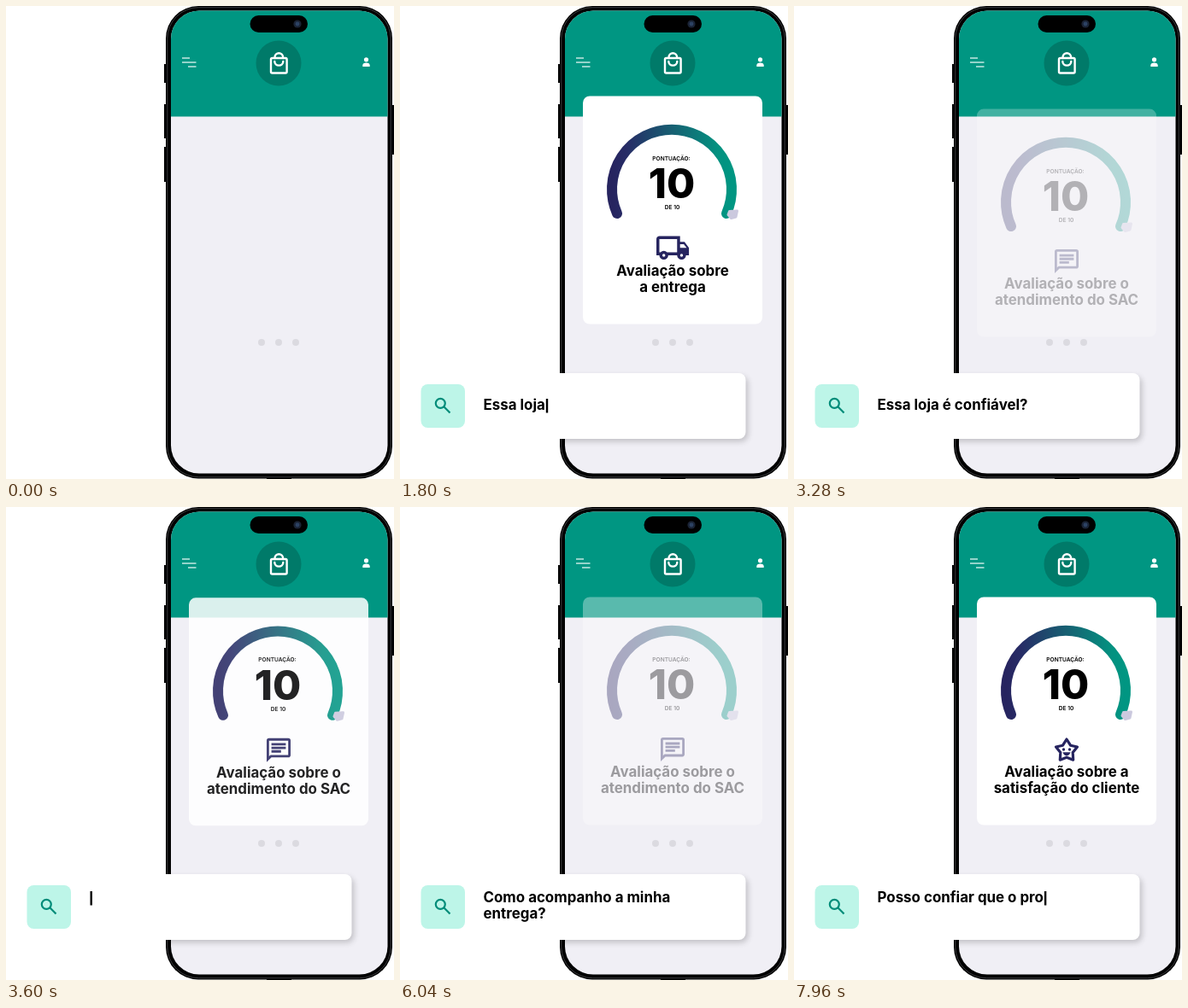
An HTML page for the animation above (8 s loop, 454 by 554 pixels).

```html
<!DOCTYPE html>
<html lang="pt-BR">
<head>
<meta charset="utf-8">
<title>Avaliação da loja</title>
<style>
html, body { margin: 0; width: 100%; height: 100%; overflow: hidden; background: #fff; }
svg { display: block; width: 454px; height: 554px; }
text { font-family: Inter, "Open Sans", sans-serif; font-weight: 700; font-size: 16.9px; white-space: pre; }
.mid { text-anchor: middle; }
.small { font-size: 6.6px; font-weight: 600; }
.score { font-size: 48px; font-weight: 800; }
.navy { fill: #26245f; }
.line { fill: none; stroke-linecap: round; stroke-linejoin: round; }

.card, .bar, .icon { opacity: 0; animation: 8s linear infinite; }
.card1 { animation-name: fade1, rise1; }
.card2 { animation-name: fade2, rise2; }
.card3 { animation-name: fade3, rise3; }
.bar { animation-name: bar; }
.icon { animation-name: icon; }

@keyframes fade1 {
  0%, .375% { opacity: 0; animation-timing-function: cubic-bezier(.3, .36, .65, .75); }
  7.625%, 32.75% { opacity: 1; }
  39.5%, 100% { opacity: 0; }
}
@keyframes fade2 {
  0%, 39.5% { opacity: 0; animation-timing-function: cubic-bezier(.3, .36, .65, .75); }
  46.25%, 71.1% { opacity: 1; }
  77.9%, 100% { opacity: 0; }
}
@keyframes fade3 {
  0%, 77.9% { opacity: 0; animation-timing-function: cubic-bezier(.3, .36, .65, .75); }
  84.6%, 100% { opacity: 1; }
}
/* ease-out quad */
@keyframes rise1 {
  0%, .375% { transform: translateY(25px); animation-timing-function: cubic-bezier(.333, .667, .667, 1); }
  7.625%, 100% { transform: none; }
}
@keyframes rise2 {
  0%, 39.5% { transform: translateY(25px); animation-timing-function: cubic-bezier(.333, .667, .667, 1); }
  46.25%, 100% { transform: none; }
}
@keyframes rise3 {
  0%, 77.9% { transform: translateY(25px); animation-timing-function: cubic-bezier(.333, .667, .667, 1); }
  84.6%, 100% { transform: none; }
}
@keyframes bar { 0%, 7% { opacity: 0; } 12.5%, 100% { opacity: 1; } }
@keyframes icon { 0%, 10.75% { opacity: 0; } 14.75%, 100% { opacity: 1; } }
</style>
</head>
<body>
<svg viewBox="0 0 454 554">
  <defs>
    <linearGradient id="arc" gradientUnits="userSpaceOnUse" x1="248" y1="0" x2="388" y2="0">
      <stop offset="0" stop-color="#26245f"/>
      <stop offset=".12" stop-color="#272c66"/>
      <stop offset=".5" stop-color="#175f72"/>
      <stop offset=".88" stop-color="#049180"/>
      <stop offset="1" stop-color="#009682"/>
    </linearGradient>
    <clipPath id="screen"><rect x="193" y="5.5" width="253.5" height="542" rx="33"/></clipPath>
    <filter id="blur" x="-10%" y="-30%" width="120%" height="160%"><feGaussianBlur stdDeviation="3.5"/></filter>
    <g id="gauge">
      <rect x="214" y="105.5" width="210" height="267" rx="8" fill="#fff"/>
      <path class="line" d="M254 243A70 70 0 1 1 382 243" stroke="url(#arc)" stroke-width="12"/>
      <path class="line" d="M385.5 240.5L394.500 240L393 247L387.500 248.500L384 244.500Z" fill="#cbc9de" stroke="#cbc9de" stroke-width="3" style="fill:#cbc9de"/>
      <text class="mid small" x="317.5" y="180.6">PONTUAÇÃO:</text>
      <text class="mid score" x="318" y="225">10</text>
      <text class="mid small" x="318.5" y="238">DE 10</text>
    </g>
  </defs>

  <g id="phone">
    <path d="M185 68h4v22h-4zM185 115h4v40h-4zM185 165h4v41h-4zM450 116h4v58h-4zM305 551h29v3h-29z"/>
    <rect x="187" y="0" width="265" height="553.500" rx="38"/>
    <rect x="188.800" y="1.700" width="261.400" height="550" rx="36.500" fill="none" stroke="#4b4b4e" stroke-width=".8"/>
    <g clip-path="url(#screen)">
      <path d="M190 0h260v554H190z" fill="#f0eff5"/>
      <path d="M190 0h260v129.500H190z" fill="#009682"/>
    </g>
    <rect x="285.500" y="11" width="67.500" height="20" rx="10"/>
    <circle cx="341" cy="21" r="4.600" fill="#1b2436"/>
    <circle cx="341" cy="21" r="2.400" fill="#2c4263"/>
    <path d="M206 61h9M206 66h16.500M213 71h9.500" stroke="#c5e8e2" stroke-width="1.400"/>
    <circle cx="319" cy="67" r="26.500" fill="#007a69"/>
    <g class="line" stroke="#fff" stroke-width="2.400">
      <rect x="310" y="61" width="18.600" height="17.500" rx="1.500"/>
      <path d="M314.500 61V60a4.800 4.800 0 0 1 9.600 0V61M314.300 65a5 4.600 0 0 0 10 0"/>
    </g>
    <circle cx="421.500" cy="62.800" r="2.600" fill="#fff"/>
    <path d="M417.300 71V69.500q0-3 4.200-3t4.200 3V71z" fill="#fff"/>
    <g fill="#dbdae0">
      <circle cx="299" cy="394" r="4"/><circle cx="319" cy="394" r="4"/><circle cx="339" cy="394" r="4"/>
    </g>
  </g>

  <g class="card card1">
    <use href="#gauge"/>
    <path class="navy" fill-rule="evenodd" transform="translate(298.300 262.500) scale(1.730)" d="M20 8h-3V4H3c-1.100 0-2 .9-2 2v11h2a3 3 0 0 0 6 0h6a3 3 0 0 0 6 0h2v-5zM19.500 9.500l1.960 2.500H17V9.500zM6 18a1 1 0 1 1 0-2a1 1 0 0 1 0 2zM8.220 15a3 3 0 0 0-4.440 0H3V6h12v9zM18 18a1 1 0 1 1 0-2a1 1 0 0 1 0 2z"/>
    <text class="mid" x="319" y="316">Avaliação sobre</text>
    <text class="mid" x="319" y="335">a entrega</text>
  </g>
  <g class="card card2">
    <use href="#gauge"/>
    <path class="navy" fill-rule="evenodd" transform="translate(302.200 267.200) scale(1.400)" d="M4 2q-2 0-2 2v18l4-4h14q2 0 2-2V4q0-2-2-2zM4 4h16v12H5.200L4 17.200zM6 12h8v2H6zM6 9h12v2H6zM6 6h12v2H6z"/>
    <text class="mid" x="319" y="316">Avaliação sobre o</text>
    <text class="mid" x="319" y="335">atendimento do SAC</text>
  </g>
  <g class="card card3">
    <use href="#gauge"/>
    <g transform="translate(319 285)">
      <path class="line" stroke="#26245f" stroke-width="3.200" d="M0-13L4.500-5.800L12.500-4L7.200 2.500L7.700 11.200L0 8.200L-7.700 11.200L-7.200 2.500L-12.500-4L-4.500-5.800Z"/>
      <circle class="navy" cx="-3.500" cy="-1" r="1.700"/>
      <circle class="navy" cx="3.500" cy="-1" r="1.700"/>
      <path class="navy" d="M-4.500 2.300h9q-1.200 4-4.500 4t-4.500-4z"/>
    </g>
    <text class="mid" x="319" y="316">Avaliação sobre a</text>
    <text class="mid" x="319" y="335">satisfação do cliente</text>
  </g>

  <g class="bar">
    <g clip-path="url(#screen)">
      <rect x="14" y="434" width="393" height="76" rx="8" fill="#000" opacity=".2" filter="url(#blur)"/>
    </g>
    <rect x="10" y="430" width="394.500" height="77" rx="8" fill="#fff"/>
  </g>
  <g class="icon">
    <rect x="24.500" y="443" width="51.500" height="51" rx="8" fill="#bdf5e8"/>
    <g fill="none" stroke="#008c79" stroke-width="2.200">
      <circle cx="47.300" cy="465.300" r="5.500"/>
      <path d="M51.300 469.300L58.500 476.500"/>
    </g>
  </g>
  <text id="line0" x="97.500"></text>
  <text id="line1" x="97.500"></text>
  <rect id="caret" width="2.400" height="16.500"/>
</svg>
<script>
const LOOP = 8000;
// from/to: when the question is shown; first: first letter; step: ms per letter
const questions = [
  { lines: ["Essa loja é confiável?"], y: 473, from: 1193, to: 3580, first: 1257, step: 64 },
  { lines: ["Como acompanho a minha ", "entrega?"], y: 463, from: 3580, to: 6580, first: 3683, step: 64 },
  { lines: ["Posso confiar que o produto"], y: 463, from: 6580, to: LOOP, first: 6658, step: 59 }
];
const rows = [line0, line1];
const caretBox = document.getElementById("caret");

function draw(t) {
  const q = questions.find(q => t >= q.from && t < q.to);
  const total = q ? q.lines.join("").length : 0;
  const typed = q ? Math.min(total, Math.max(0, Math.floor((t - q.first) / q.step) + 1)) : 0;
  let left = typed, last = 0;
  rows.forEach((row, i) => {
    const line = q && q.lines[i] || "";
    if (left > 0) last = i;
    row.textContent = line.slice(0, Math.max(0, left));
    if (q) row.setAttribute("y", q.y + i * 19.3);
    left -= line.length;
  });
  caretBox.style.display = typed < total ? "" : "none";
  if (typed < total) {
    const width = rows[last].textContent ? rows[last].getComputedTextLength() : 0;
    caretBox.setAttribute("x", 98.5 + width);
    caretBox.setAttribute("y", q.y - 13 + last * 19.3);
  }
}

let start;
function tick(now) {
  start ??= now;
  draw((now - start) % LOOP);
  requestAnimationFrame(tick);
}
draw(0);
requestAnimationFrame(tick);
</script>
</body>
</html>
```
